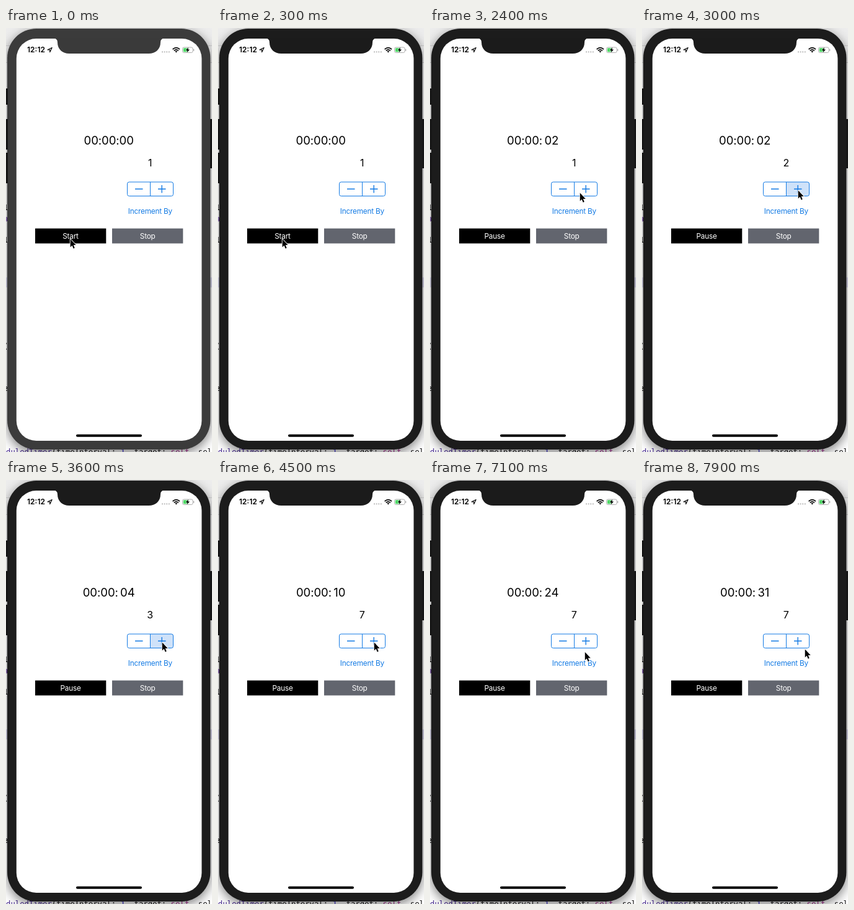
These frames come from a looping animation (332 px wide and 680 px high, 8 s). An HTML page:

```html
<!DOCTYPE html>
<html lang="en">
<head>
<meta charset="utf-8">
<title>Timer</title>
<style>
  html, body { margin: 0; width: 100%; height: 100%; overflow: hidden; background: #fff; }
  svg { display: block; font-family: Inter, Roboto, sans-serif; }
  .label { font-size: 11.8px; letter-spacing: -.2px; text-anchor: middle; }
  .code { font: 12.25px "DejaVu Sans Mono", monospace; white-space: pre; }
  .blue { stroke: #147be4; fill: none; }
  #clock { font-size: 18.6px; letter-spacing: -.1px; word-spacing: -1.8px; text-anchor: middle; }
</style>
</head>
<body>
<svg width="332" height="680" viewBox="0 0 332 680">
  <defs>
    <filter id="shadow" x="-10%" y="-10%" width="120%" height="120%">
      <feDropShadow dx="0" dy="5" stdDeviation="9" flood-opacity=".52"/>
    </filter>
  </defs>

  <!-- Editor window behind the phone -->
  <rect width="332" height="680" fill="#fff"/>
  <rect width="332" height="55" fill="#f5f5f5"/>
  <rect width="332" height="28" fill="#ededed"/>
  <path d="M0 28.5H332M0 55.5H332" stroke="#d2d2d2"/>
  <rect y="400" width="332" height="16" fill="#e4e2f6"/>
  <g class="code">
    <text x="-4" y="292">1</text>
    <text x="-4" y="310" fill="#5b2699">a</text>
    <text x="-4" y="344">1</text>
    <text x="-4" y="515">(</text>
    <text x="-4" y="582">e</text>
    <text x="0" y="684" fill="#111"><tspan fill="#43258f">duledTimer</tspan>(timeInterval: <tspan fill="#2a22d0">1</tspan>, target: <tspan fill="#a82a90">self</tspan>, sel</text>
  </g>

  <!-- Phone -->
  <rect id="bezel" x="2" y="1" width="327.4" height="675" rx="47" filter="url(#shadow)"/>
  <path d="M0 97h3v26H0zM0 146h3v49H0zM0 200h3v49H0zM329 146h3v79h-3z" fill="#161616"/>
  <rect x="16.8" y="17" width="298.6" height="645" rx="32" fill="#fff"/>
  <path id="notch" d="M77 16.5Q83 17 83 23C83 34 91 41 102 41H230C241 41 249 34 249 23Q249 17 255 16.5Z"/>

  <!-- Status bar -->
  <text x="34" y="39.3" font-size="12" font-weight="600">12:12</text>
  <path d="M74.2 31.6L67 35H70.7V38.7Z" fill="none" stroke="#000" stroke-width="1.1" stroke-linejoin="round"/>
  <path d="M252 38.4h11" stroke="#bbb" stroke-width="2.2" stroke-linecap="round" stroke-dasharray="0 3.6"/>
  <g fill="none" stroke="#000" stroke-width="1.7">
    <path d="M268.6 34.2Q274.3 29.2 280 34.2M270.7 36.4Q274.3 33.3 277.9 36.4"/>
    <path d="M272.4 37.5Q274.3 35.9 276.2 37.5L274.3 39.5Z" fill="#000" stroke="none"/>
  </g>
  <rect x="284.5" y="31" width="16.5" height="8.5" rx="2.3" fill="#fff" stroke="#a5a5a5" stroke-width=".9"/>
  <rect x="285.8" y="32.3" width="8" height="5.9" rx="1.2" fill="#4cd964"/>
  <path d="M302.6 33.8v3" stroke="#a5a5a5" stroke-width="1.2"/>
  <path d="M294.2 30.8L289.7 35.9H292.4L291.3 39.8L296 34.5H293.2Z" stroke="#fff" stroke-width=".8" paint-order="stroke"/>

  <!-- App -->
  <text id="clock" x="165.7" y="187"></text>
  <text id="step" x="232.3" y="222.4" font-size="16" text-anchor="middle"></text>
  <path id="press" d="M232.5 247H266.5Q269.5 247 269.5 250V266.5Q269.5 269.5 266.5 269.5H232.5Z" fill="#cfe2f9"/>
  <rect class="blue" x="195.5" y="247" width="74" height="22.5" rx="3"/>
  <path class="blue" d="M232.5 247V269.5"/>
  <path class="blue" stroke-width="1.4" d="M208 258.2H220.5M245 258.2H257.5M251.2 252V264.4"/>
  <text class="label" x="232.4" y="298" fill="#147be4">Increment By</text>
  <rect x="47" y="321.5" width="114.3" height="24"/>
  <rect x="171" y="321.5" width="114.3" height="24" fill="#62656e"/>
  <text id="action" class="label" x="104" y="337.8" fill="#fff"></text>
  <text class="label" x="228.2" y="337.8" fill="#fff">Stop</text>
  <rect x="113" y="651.8" width="106" height="4" rx="2"/>

  <path id="cursor" d="M.7 1.6V14.4L3.6 11.8L5.7 16.7L7.7 15.8L5.7 11H9.7Z" stroke="#fff" stroke-width="1.8" stroke-linejoin="round" paint-order="stroke"/>
</svg>
<script>
  const LOOP = 8000;
  const FOCUS = 200, START = 400, PRESS_LENGTH = 80;
  const presses = [[3000, 200], [3500, 200], [4000], [4150], [4300], [4420]];

  // Cursor tip: time, x, y
  const path = [
    [0, 103, 337], [700, 103, 337], [1000, 135, 339], [1300, 193, 343],
    [1700, 238, 268], [2000, 238, 268], [2400, 241, 263], [2800, 251, 259],
    [4900, 251, 259], [5000, 255, 261], [5100, 185, 284], [6400, 185, 284],
    [6700, 235, 278], [6800, 235, 278], [7400, 263, 271], [7800, 263, 271], [7900, 262, 270]
  ];

  const [bezel, notch, clock, step, press, action, cursor] =
    ['bezel', 'notch', 'clock', 'step', 'press', 'action', 'cursor'].map(id => document.getElementById(id));

  const stepAt = t => 1 + presses.filter(([at]) => t >= at).length;

  // The timer fires once a second after Start and adds the current step.
  function secondsAt(t) {
    let total = 0;
    for (let tick = START + 1000; tick <= t; tick += 1000) total += stepAt(tick);
    return total;
  }

  function cursorAt(t) {
    const next = path.findIndex(([at]) => at > t);
    if (next < 0) return path[path.length - 1].slice(1);
    const [t0, x0, y0] = path[next - 1], [t1, x1, y1] = path[next];
    const k = (t - t0) / (t1 - t0);
    return [x0 + (x1 - x0) * k, y0 + (y1 - y0) * k];
  }

  function draw(t) {
    const seconds = secondsAt(t);
    const color = t < FOCUS ? '#3a3a3a' : '#1b1b1b';
    bezel.setAttribute('fill', color);
    notch.setAttribute('fill', color);
    clock.textContent = seconds ? '00:00: ' + String(seconds).padStart(2, '0') : '00:00:00';
    step.textContent = stepAt(t);
    action.textContent = t < START ? 'Start' : 'Pause';
    const pressed = presses.some(([at, length = PRESS_LENGTH]) => t >= at && t < at + length);
    press.style.visibility = pressed ? 'visible' : 'hidden';
    cursor.setAttribute('transform', `translate(${cursorAt(t)})`);
  }

  const begin = performance.now();
  function frame() {
    draw((performance.now() - begin) % LOOP);
    requestAnimationFrame(frame);
  }
  frame();
</script>
</body>
</html>
```
